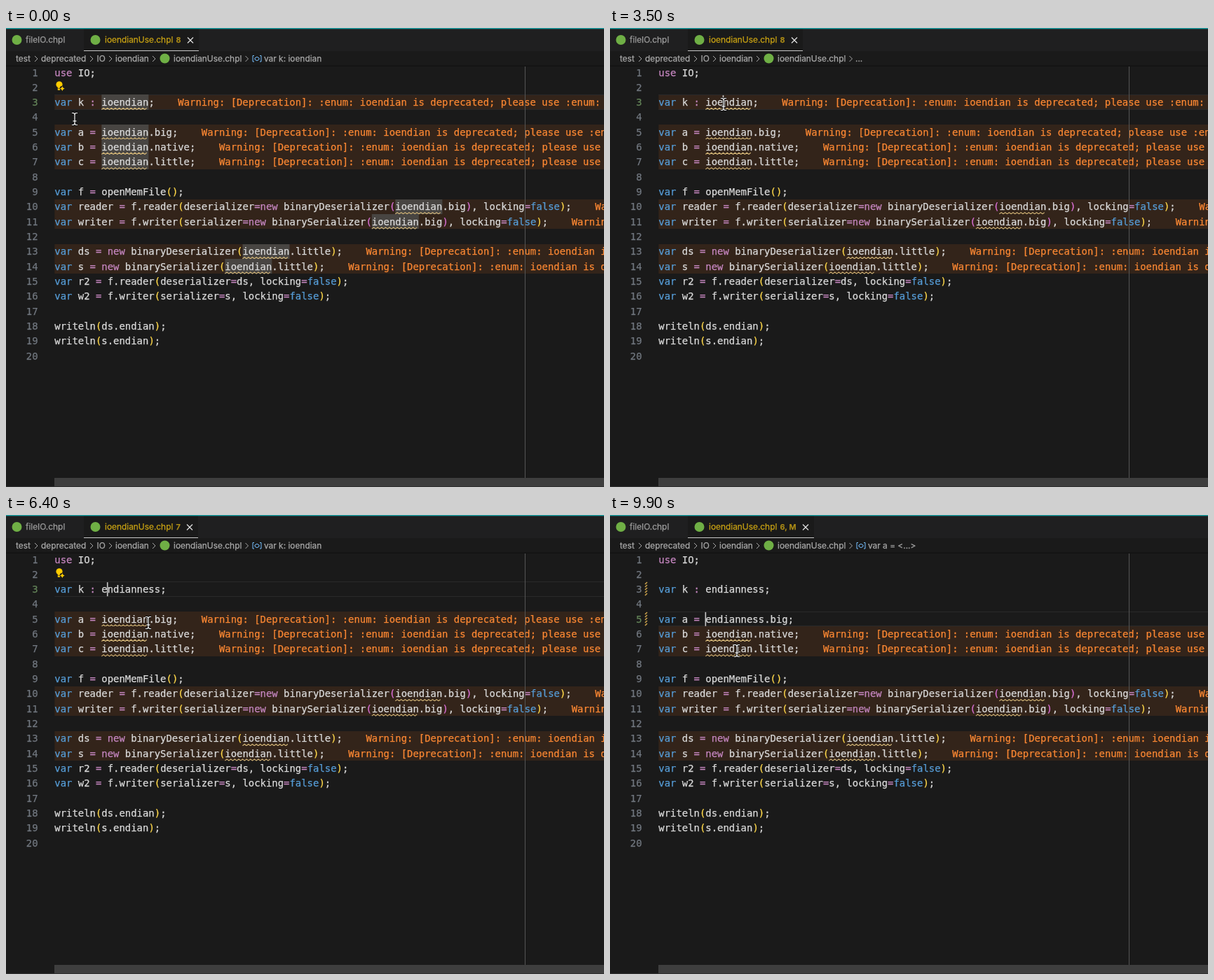
Recreate the animation shown at these times as an HTML page with a canvas. Size 853x656 px, loop 10 s.

```html
<!DOCTYPE html>
<html lang="en">
<head>
<meta charset="utf-8">
<style>
html, body { margin: 0; width: 100%; height: 100%; overflow: hidden; background: #1a1a1a; }
canvas { display: block; }
</style>
</head>
<body>
<canvas id="stage" width="853" height="656"></canvas>
<script>
const ctx = document.getElementById('stage').getContext('2d');
const LOOP = 10000, LEFT = 69.3, CHAR = 8.38, ROW = 21.32;
const MONO = '13.92px "DejaVu Sans Mono", monospace';
const UI = '11.9px Inter, sans-serif';
const WARNING = 'Warning: [Deprecation]: :enum: ioendian is deprecated; please use :enum: endianness instead';
const OLD = 'ioendian', NEW = 'endianness';
const CODE = `use IO;

var k : ioendian;

var a = ioendian.big;
var b = ioendian.native;
var c = ioendian.little;

var f = openMemFile();
var reader = f.reader(deserializer=new binaryDeserializer(ioendian.big), locking=false);
var writer = f.writer(serializer=new binarySerializer(ioendian.big), locking=false);

var ds = new binaryDeserializer(ioendian.little);
var s = new binarySerializer(ioendian.little);
var r2 = f.reader(deserializer=ds, locking=false);
var w2 = f.writer(serializer=s, locking=false);

writeln(ds.endian);
writeln(s.endian);
`.split('\n');

// Editor states: each entry overrides the fields of the previous one.
const STATES = [
  { t: 0, line: 3, col: -1, bulb: 2, marks: true, symbol: 'var k: ioendian', fixed: [], saved: [], badge: '8', menu: 0 },
  { t: 300, line: 4, col: 0, bulb: 0, marks: false, symbol: '', blink: 300 },
  { t: 3400, line: 3, col: 11, blink: 3400 },
  { t: 3900, symbol: 'var k: ioendian', marks: true, bulb: 2 },
  { t: 4200, col: 9, blink: 4200 },
  { t: 5000, menu: 3 },
  { t: 6000, menu: 0, fixed: [3], marks: false, badge: '7', blink: 6000 },
  { t: 6500, saved: [3], bulb: 0 },
  { t: 7300, line: 5, col: 9, blink: 7400, symbol: 'var a = <...>' },
  { t: 7500, marks: true, bulb: 4 },
  { t: 8100, menu: 5 },
  { t: 8900, menu: 0, fixed: [3, 5], marks: false, badge: '6', col: 8, blink: 8900, bulb: 0 },
  { t: 9200, saved: [3, 5] },
  { t: 9600, badge: '6, M' }
];

// Pointer path: time, x, y.
const PATH = [
  [0, 98, 130], [300, 98, 130], [700, 260, 440], [900, 260, 440], [1800, 450, 690],
  [2000, 450, 690], [2800, 180, 125], [3300, 162, 109], [3900, 162, 109], [4200, 146, 108],
  [4700, 76, 86], [5000, 76, 86], [5400, 145, 118], [5600, 145, 118], [5850, 170, 156],
  [6000, 170, 156], [6400, 203, 154], [6800, 146, 150], [7400, 146, 150], [7800, 75, 143],
  [8000, 76, 128], [8200, 76, 128], [8600, 160, 198], [8900, 160, 198], [9500, 181, 194], [10000, 181, 194]
];

const rowY = n => 63.5 + ROW * (n - 1);
const colX = c => LEFT + CHAR * c;

function rect(x, y, w, h, color) {
  ctx.fillStyle = color;
  ctx.fillRect(x, y, w, h);
}

// A hairline outline gives the slightly heavier strokes of the editor's text.
function text(str, x, y, color, font = UI, align = 'left') {
  ctx.font = font;
  ctx.textAlign = align;
  ctx.fillStyle = ctx.strokeStyle = color;
  ctx.lineWidth = 0.25;
  ctx.fillText(str, x, y);
  ctx.strokeText(str, x, y);
}

function stroke(points, color, width = 1, close = false) {
  ctx.beginPath();
  points.forEach(([x, y]) => ctx.lineTo(x, y));
  if (close) ctx.closePath();
  ctx.strokeStyle = color;
  ctx.lineWidth = width;
  ctx.stroke();
}

function disc(x, y, r, color) {
  ctx.beginPath();
  ctx.arc(x, y, r, 0, 7);
  ctx.fillStyle = color;
  ctx.fill();
}

function stateAt(t) {
  return Object.assign({}, ...STATES.filter(s => s.t <= t));
}

function pointerAt(t) {
  const i = PATH.findIndex(p => p[0] > t), [t0, x0, y0] = PATH[i - 1], [t1, x1, y1] = PATH[i];
  const u = (t - t0) / (t1 - t0), e = u * u * (3 - 2 * u);
  return [x0 + (x1 - x0) * e, y0 + (y1 - y0) * e];
}

function drawTabs(s) {
  const end = { 8: 275, 7: 274, 6: 274 }[s.badge] || 291;
  rect(0, 0, 853, 33, '#1f1f20');
  rect(111, 0, end - 111, 33, '#1a1a1a');
  rect(0, 0, 853, 1.3, '#16a3a6');
  rect(111, 32, end - 111, 1, '#c8c8c8');
  disc(15.5, 17, 7, '#6faf45');
  text('fileIO.chpl', 28, 21.3, '#9b9b9b');
  disc(127.5, 17, 7, '#6faf45');
  text('ioendianUse.chpl', 141, 21.3, '#c6a013');
  text(s.badge, 242.5, 21.3, '#b08f16', '600 11px Inter, sans-serif');
  const x = end - 12;
  stroke([[x - 4, 13.5], [x + 4, 21.5]], '#e0e0e0', 1.2);
  stroke([[x + 4, 13.5], [x - 4, 21.5]], '#e0e0e0', 1.2);
}

function drawBreadcrumb(s) {
  const color = '#a8a8a8', y = 48.3;
  [['test', 14], ['deprecated', 50], ['IO', 129.5], [OLD, 156], ['ioendianUse.chpl', 239]]
    .forEach(([str, x]) => text(str, x, y, color));
  for (const x of [41, 120, 147, 209, 341.5]) stroke([[x, 40], [x + 4, 44], [x, 48]], color);
  disc(226.5, 43.5, 7, '#6faf45');
  if (!s.symbol) return text('...', 350, y, color);
  text(s.symbol, 368, y, color);
  const blue = '#75beff';
  stroke([[354, 39.5], [352, 39.5], [352, 48], [354, 48]], blue);
  stroke([[362, 39.5], [364, 39.5], [364, 48], [362, 48]], blue);
  stroke([[355, 43], [358, 41.3], [361, 43], [361, 45], [358, 46.7], [355, 45]], blue, 1, true);
}

function drawCode(code, n) {
  let depth = 0, col = 0;
  for (const token of code.match(/\w+|\s+|./g) || []) {
    let color = '#dadada';
    if (/^(var|false)$/.test(token)) color = '#569cd6';
    if (/^(use|new|=|:)$/.test(token)) color = '#c586c0';
    if (token === '(') color = depth++ ? '#da70d6' : '#ffd84a';
    if (token === ')') color = --depth ? '#da70d6' : '#ffd84a';
    text(token, colX(col), rowY(n) + 5, color, MONO);
    col += token.length;
  }
}

function drawSquiggle(x, y, width) {
  const points = [];
  for (let i = 0; i * 2.8 <= width; i++) points.push([x + i * 2.8, y + (i % 2 ? -1.1 : 1.1)]);
  stroke(points, '#d6b878', 1.1);
}

function drawRow(source, i, s) {
  const n = i + 1, y = rowY(n), top = Math.round(y - ROW / 2), height = Math.round(y + ROW / 2) - top;
  const fixed = s.fixed.includes(n), at = source.indexOf(OLD);
  const code = fixed ? source.replace(OLD, NEW) : source;
  const warned = at >= 0 && !fixed;
  if (warned) rect(LEFT, top, 853, height, '#33241a');
  if (s.line === n) {
    rect(LEFT, top, 853, 1, '#292929');
    rect(LEFT, top + height - 1, 853, 1, '#292929');
  }
  if (warned && s.marks) rect(colX(at), top, CHAR * 8, height, '#484542');
  text(n, 45.5, y + 5, s.line === n ? '#65865a' : '#727880', MONO, 'right');
  drawCode(code, n);
  if (warned) {
    text(WARNING, colX(code.length + 4), y + 5, '#fa8733', MONO);
    drawSquiggle(colX(at), y + 9.3, CHAR * 8);
  }
  if (s.saved.includes(n)) {
    for (let d = 0; d < 20; d += 4) stroke([[50, top + d + 4], [53, top + d + 1]], '#c9a04a', 1.6);
  }
}

function drawBulb(x, y, sparkle) {
  disc(x, y - 2, 4.6, '#ffcc00');
  rect(x - 2.2, y + 1, 4.4, 5, '#ffcc00');
  rect(x - 2.2, y + 3, 4.4, 0.8, '#5a4a10');
  if (!sparkle) return;
  disc(x + 4.3, y + 3.6, 3.6, '#1a1a1a');
  drawStar(x + 4.3, y + 3.8, 3.4, true);
}

function drawStar(x, y, r, solid) {
  ctx.beginPath();
  for (let k = 0; k < 8; k++) {
    const a = k * Math.PI / 4, d = k % 2 ? r * 0.5 : r;
    ctx.lineTo(x + d * Math.cos(a), y + d * Math.sin(a));
  }
  ctx.closePath();
  ctx.lineWidth = 1;
  ctx.strokeStyle = '#c4c4c4';
  ctx.fillStyle = '#ffcc00';
  if (solid) ctx.fill(); else ctx.stroke();
}

function drawMenu(line) {
  const y = rowY(line) + 14;
  rect(79, y, 349, 92, '#454545');
  rect(80, y + 1, 347, 90, '#1f1f1f');
  text('Quick Fix', 89, y + 17, '#9c9c9c', '500 11.5px Inter, sans-serif');
  rect(80, y + 25, 347, 22, '#05325a');
  drawBulb(97, y + 35.5);
  text('Resolve Deprecation: replace ioendian with endianness', 109, y + 40, '#ffffff');
  ['Fix using Nimbrel', 'Explain using Nimbrel'].forEach((label, i) => {
    const base = y + 62 + 22 * i;
    text(label, 109, base, '#cccccc');
    drawStar(95.5, base - 5, 4.5);
    drawStar(100.5, base, 2);
  });
}

function drawPointer(x, y, arrow) {
  if (arrow) {
    const shape = [[0, -6], [0, 6.5], [2.8, 4], [4.8, 8.5], [6.8, 7.6], [4.9, 3.3], [8.6, 3]].map(([a, b]) => [x + a, y + b]);
    stroke(shape, '#ffffff', 2, true);
    ctx.fillStyle = '#111';
    ctx.fill();
    return;
  }
  for (const [color, width] of [['#111', 3], ['#fff', 1.2]]) {
    stroke([[x, y - 7], [x, y + 7]], color, width);
    stroke([[x - 4, y - 8.5], [x - 1.5, y - 8.5], [x, y - 7], [x + 1.5, y - 8.5], [x + 4, y - 8.5]], color, width);
    stroke([[x - 4, y + 8.5], [x - 1.5, y + 8.5], [x, y + 7], [x + 1.5, y + 8.5], [x + 4, y + 8.5]], color, width);
    stroke([[x - 2.5, y + 3], [x + 2.5, y + 3]], color, width);
  }
}

function draw(t) {
  const s = stateAt(t);
  rect(0, 0, 853, 656, '#1a1a1a');
  drawTabs(s);
  drawBreadcrumb(s);
  rect(0, 53.5, 853, 1.5, '#121212');
  CODE.forEach((code, i) => drawRow(code, i, s));
  rect(740, 55, 1, 601, '#555555');
  rect(69, 643, 784, 12, '#3e3e3e');
  rect(0, 655, 853, 1, '#303030');
  if (s.bulb) drawBulb(76, rowY(s.bulb) - 2, true);
  if (s.col >= 0 && !s.menu && (t - s.blink + LOOP) % 1000 < 500) {
    rect(colX(s.col) - 0.8, rowY(s.line) - 10, 1.6, 20, '#c8c8c8');
  }
  if (s.menu) drawMenu(s.menu);
  drawPointer(...pointerAt(t), s.menu > 0);
}

function tick() {
  draw(performance.now() % LOOP);
  requestAnimationFrame(tick);
}
tick();
</script>
</body>
</html>
```
